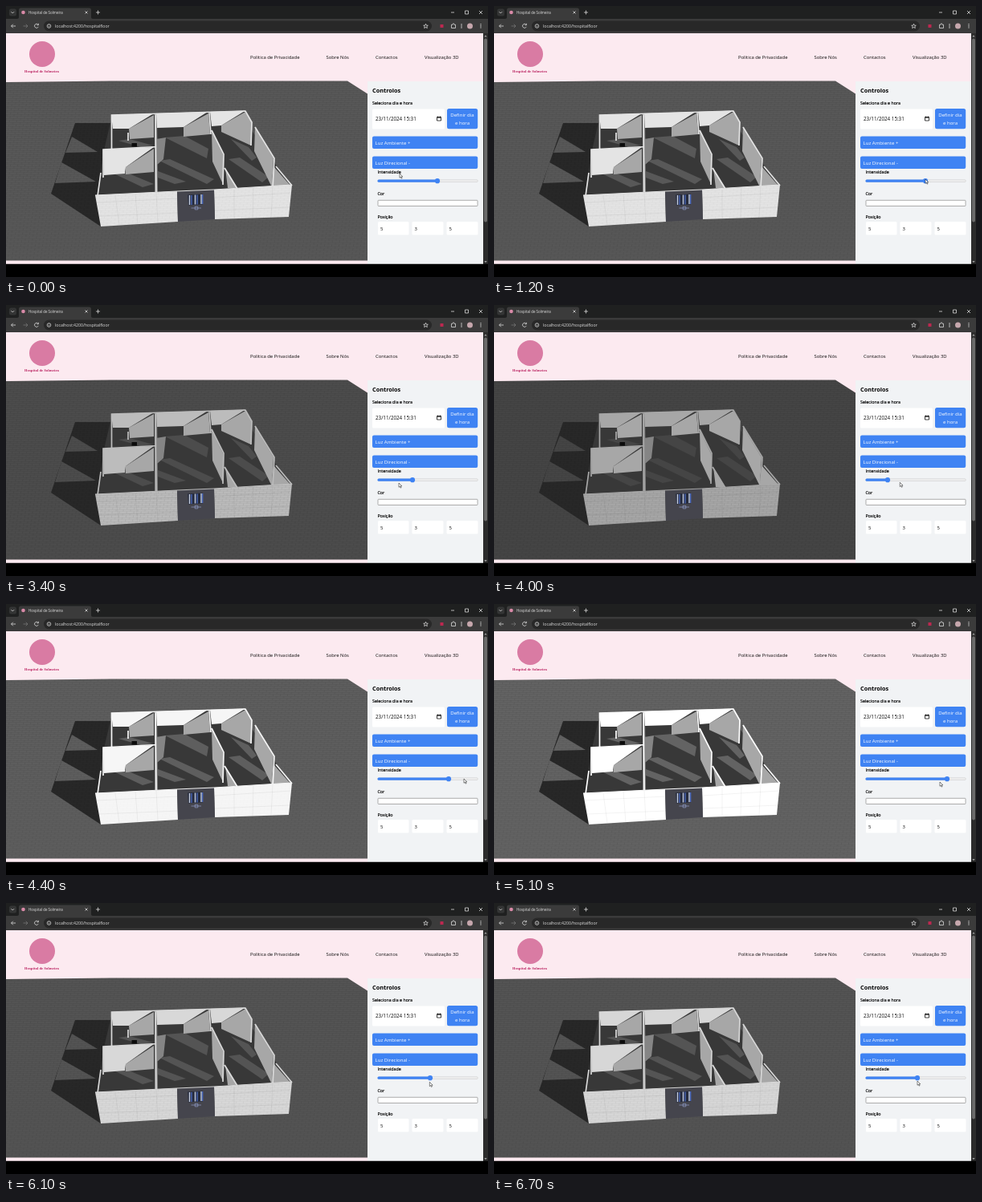
Animation, 600 px wide and 338 px high, one loop 6800 ms. Source, as an HTML page:

```html
<!DOCTYPE html>
<html lang="pt">
<head>
<meta charset="utf-8">
<title>Hospital de Solmeira</title>
<style>
html, body { margin: 0; width: 100%; height: 100%; overflow: hidden; background: #000; }
svg { display: block; width: 100vw; height: 100vh; }
text { font: 5.9px "Open Sans", "Noto Sans", sans-serif; fill: #0c0c0c; }
.label { font-size: 5.35px; fill: #000; stroke: #000; stroke-width: .14; }
.light { fill: #fff; font-size: 6.1px; }
.ground { fill: var(--ground); }
.shade { fill: #282828; }
.floor { fill: #383838; }
.grey { fill: #a7a7a7; }
.wall { fill: var(--wall); }
.edge { fill: none; stroke: var(--wall); stroke-width: 1.7; }
.joint { fill: none; stroke: #000; stroke-opacity: .1; stroke-width: .5; }
.icon { fill: none; stroke: #d8d8d8; stroke-width: .8; }
.blue { fill: #3f83f3; }
.white { fill: #fff; }
</style>
</head>
<body>
<svg id="stage" viewBox="0 0 600 338" preserveAspectRatio="none">
  <defs>
    <pattern id="bricks" width="9" height="5" patternUnits="userSpaceOnUse" patternTransform="skewX(-8)">
      <path d="M0 .3H9M0 2.8H9M2 0V2.5M6.5 2.5V5" stroke="#000" stroke-opacity=".13" stroke-width=".5"/>
    </pattern>
  </defs>

  <!-- browser frame -->
  <path fill="#1f2020" d="M0 0H600V17H0z"/>
  <path fill="#3b3b3b" d="M0 16H14Q16 16 16 14V5Q16 2.500 18.500 2.500H103.500Q106 2.500 106 5V14Q106 16 108 16H600V34H0z"/>
  <rect x="4" y="3.500" width="9" height="9" rx="2.500" fill="#343535"/>
  <rect x="47" y="18.500" width="483" height="13" rx="6.500" fill="#282828"/>
  <circle cx="21.500" cy="8" r="2.300" fill="#d98aa8"/>
  <text x="28" y="9.700" style="font-size:4.45px;fill:#e4e4e4">Hospital de Solmeira</text>
  <text x="61" y="26.800" style="font-size:5.2px;fill:#e0e0e0">localhost:4200/hospitalfloor</text>
  <g class="icon">
    <path d="M6.500 7.200l1.800 1.800 1.800-1.800M98.500 6.500l3 3m0-3l-3 3M112 8h5m-2.500-2.500v5"/>
    <path d="M554 8h4M571.500 6h4v4h-4zM589 6l4 4m0-4l-4 4"/>
    <path d="M12 25H6.500m2.300-2.300L6.500 25l2.300 2.300"/>
    <path stroke="#777" d="M21.500 25H27m-2.300-2.300L27 25l-2.300 2.300"/>
    <path d="M40 23.300a2.500 2.500 0 1 0 .3 2.600M40.400 21.800v2h-2"/>
    <circle cx="53.500" cy="25" r="2.300"/><path d="M53.500 24.700v1.500M53.500 23.500v.4"/>
    <path d="M522.500 22.300l.8 1.900 2 .1-1.500 1.300.5 2-1.800-1.100-1.800 1.100.5-2-1.500-1.300 2-.1z"/>
    <path d="M554.500 23.300h1.500q0-1.500 1-1.500t1 1.500h1.500v4.200h-5zM567 22v6"/>
    <path stroke-width="1.300" stroke-dasharray="1.100 1" d="M591 22.200v6"/>
  </g>
  <rect x="540.500" y="23" width="4" height="4" fill="#bd2850"/>
  <circle cx="577.500" cy="25" r="3.500" fill="#c6a7ad"/>

  <!-- page header -->
  <path fill="#fceaf0" d="M0 34H594V322H0z"/>
  <circle cx="45" cy="60" r="16" fill="#d97ba3"/>
  <text x="44.500" y="83.300" text-anchor="middle" style="font:bold 4.05px 'Noto Serif',serif;fill:#b91e5e">Hospital de Solmeira</text>
  <text x="304" y="66.300">Política de Privacidade</text>
  <text x="398.500" y="66.300">Sobre Nós</text>
  <text x="460" y="66.300">Contactos</text>
  <text x="521" y="66.300">Visualização 3D</text>

  <!-- ground and cast shadow -->
  <path class="ground" d="M0 95L130 93.600H425L450 109.500V317.500H0z"/>
  <path class="shade" d="M86 146H131L121 236L118 275L56 234z"/>
  <path class="ground" d="M82 163L114 182L74 183zM69 195L112 219L61 221z"/>
  <path fill="url(#bricks)" d="M0 95L130 93.600H425L450 109.500V317.500H0z"/>

  <!-- rooms -->
  <path class="floor" d="M132 137L298 131L307 157L334 195L354 225L260 230L113 236L122 180z"/>
  <path class="ground" d="M198 164L222 162L252 178L250 190zM191 193L204 191L259 216L250 222zM189 206L224 219L210 222L189 214zM280 166L302 176L312 189L306 193zM277 191L291 189L327 213L319 220zM132 208L148 207L184 222L170 226zM140 168L154 166L183 174L168 176z"/>
  <rect x="156.500" y="171" width="6.500" height="4.500" fill="#0c0c0c"/>
  <path class="grey" d="M153 153L184 136V164L154 166zM221 151L252 134L254 160L221 163zM268 149L298 132L306 145L305 174L268 157zM149 201L184 178V207L149 210zM256 156L270 185L270 222L257 194zM310 152L333 190L331 226L309 181zM273 202L288 227L276 227zM333 200L354 224L331 225z"/>
  <path fill="#858585" d="M185 136L188 135L189 232H185zM187 166L199 164L196 191L188 198z"/>
  <path class="wall" d="M131 136L184 134L153 153L133 153zM187 134L251 132L221 151L188 152zM254 132L298 130.500L268 149L256 150zM121 179L184 176L149 201L148 209L122 211z"/>
  <path class="edge" d="M131.500 178V136L298 131L306 145L305 174M186 135L187 232M253 133L255 160M121 214V179L186 175.500M128 178V183M256 155L271 185L270 223M310 151L334 190L332 227M272 202L288 228M336 200L356 224M152 158V168M114 237L118 208"/>

  <!-- facade -->
  <path class="wall" d="M111 236L213 231L214 269L118 275zM259 229L356 223L352 263L260 266z"/>
  <path class="joint" d="M136 236L141 273M161 234L164 272M187 233L189 270M284 229V264M308 227L307 264M332 225L330 263M113 245L213 240M116 262L214 258M260 239L355 233M260 255L353 251"/>
  <path id="brickWall" fill="url(#bricks)" d="M111 236L213 231L214 269L118 275zM259 229L356 223L352 263L260 266z"/>
  <path fill="#45454d" d="M213 231.500L259 229L260 266L214 269z"/>
  <path class="edge" style="stroke-width:1" d="M111 236L213 231L259 229L356 223"/>
  <path fill="#272c3d" d="M226 235.500L245 234.500V247.500L227 248.500z"/>
  <path fill="none" stroke="#c4cee3" stroke-width="1.400" d="M228.500 236V248M235.500 235.500V247.500M243 235V247"/>
  <path fill="none" stroke="#4e70cc" stroke-width="1.200" d="M231 236V248M238 235.500V247.500M244.700 235V247"/>
  <path fill="none" stroke="#9aa9dc" stroke-width=".6" d="M230.500 252H243M235.200 250.300h3.600v3.600h-3.600z"/>

  <!-- controls -->
  <path fill="#f1f3f5" d="M450 94H594V322H450z"/>
  <text x="456" y="108.300" style="font-size:7.300px;font-weight:700;fill:#000">Controlos</text>
  <text class="label" x="456" y="123">Seleciona dia e hora</text>
  <rect class="white" x="456" y="128.500" width="90" height="25" rx="1.500"/>
  <text x="460" y="143" style="font-size:6.250px">23/11/2024 15:31</text>
  <path fill="none" stroke="#111" stroke-width=".8" d="M536.500 138.500h5v4.500h-5zM536.500 139.300h5M537.600 137.400v1M540.400 137.400v1"/>
  <rect class="blue" x="549" y="128" width="38.200" height="25.200" rx="2.500"/>
  <g text-anchor="middle">
    <text class="light" x="568" y="138.300">Definir dia</text>
    <text class="light" x="568" y="147.800">e hora</text>
  </g>
  <rect class="blue" x="456" y="162.500" width="131.200" height="15.500" rx="2"/>
  <text class="light" x="459.500" y="172.600">Luz Ambiente +</text>
  <rect class="blue" x="456" y="187.600" width="131.200" height="15.500" rx="2"/>
  <text class="light" x="459.500" y="197.800">Luz Direcional -</text>
  <text class="label" x="462.500" y="209.400">Intensidade</text>
  <rect x="462.800" y="216.800" width="124.500" height="2.700" rx="1.300" fill="#efefef" stroke="#c4c4c4" stroke-width=".5"/>
  <rect id="fill" class="blue" x="462.500" y="216.600" height="3.100" rx="1.500"/>
  <circle id="knob" class="blue" cy="218.200" r="3.100"/>
  <text class="label" x="462.500" y="236">Cor</text>
  <rect class="white" x="463" y="242.300" width="124" height="7.200" rx=".7" stroke="#8b8b8b" stroke-width=".7"/>
  <text class="label" x="462.500" y="264.500">Posição</text>
  <rect class="white" x="463" y="269" width="38.500" height="16.500" rx="1.500"/>
  <rect class="white" x="505.500" y="269" width="39" height="16.500" rx="1.500"/>
  <rect class="white" x="548.500" y="269" width="39" height="16.500" rx="1.500"/>
  <text x="466" y="279.700">5</text>
  <text x="508.500" y="279.700">3</text>
  <text x="551.500" y="279.700">5</text>

  <!-- scrollbar and bottom strip -->
  <path fill="#2c2c2c" d="M594 34H600V322H594z"/>
  <rect x="595" y="40.500" width="4" height="229" rx="2" fill="#6b6b6b"/>
  <path fill="#9b9b9b" d="M597 36.200l1.700 2.200h-3.400zM597 320.300l1.700-2.200h-3.400z"/>
  <path d="M0 321.700H600V338H0z"/>
  <path id="cursor" fill="#fff" stroke="#111" stroke-width=".6" d="M0 0V6.200L1.500 4.900L2.600 7.200L3.600 6.700L2.600 4.500H4.500z"/>
</svg>
<script>
const LOOP = 6800, STEP = 100, DRAG_START = 1200;
const $ = id => document.getElementById(id);
const stage = $('stage');

// pointer path: time, x, y
const path = [
  [0, 490, 209], [600, 537, 216], [1200, 537, 216], [1700, 575, 216],
  [2000, 590, 217], [2700, 589, 217], [3000, 558, 219], [3300, 506, 221],
  [3400, 489, 222], [3600, 478, 223], [3900, 490, 222], [4300, 551, 219],
  [4400, 570, 218], [4600, 584, 219], [4800, 582, 220], [5100, 555, 222],
  [5400, 508, 225], [5500, 490, 226], [5700, 482, 226], [6000, 528, 224],
  [6300, 526, 222], [6600, 527, 222], [6800, 527, 222]
];

function pointer(t) {
  const i = Math.max(1, path.findIndex(p => p[0] >= t));
  const [t0, x0, y0] = path[i - 1], [t1, x1, y1] = path[i];
  const k = (t - t0) / (t1 - t0);
  return [x0 + (x1 - x0) * k, y0 + (y1 - y0) * k];
}

const grey = v => {
  const c = Math.round(Math.min(255, v));
  return `rgb(${c},${c},${c})`;
};

function draw(now) {
  const t = Math.floor(now % LOOP / STEP) * STEP;
  const [x, y] = pointer(t);
  // the slider trails the pointer by one step
  const knob = t < DRAG_START ? 537 : Math.min(584, Math.max(466, pointer(t - STEP)[0]));
  const power = knob - 537;

  $('cursor').setAttribute('transform', `translate(${x} ${y}) scale(.85)`);
  $('knob').setAttribute('cx', knob);
  $('fill').setAttribute('width', knob - 462.5);
  $('brickWall').setAttribute('opacity', Math.min(1, Math.max(0, .4 - power / 50)));
  stage.style.setProperty('--wall', grey(228 + power * 1.3));
  stage.style.setProperty('--ground', grey(88 + power * .4));
}

const start = performance.now();
function tick() {
  draw(performance.now() - start);
  requestAnimationFrame(tick);
}
tick();
</script>
</body>
</html>
```
